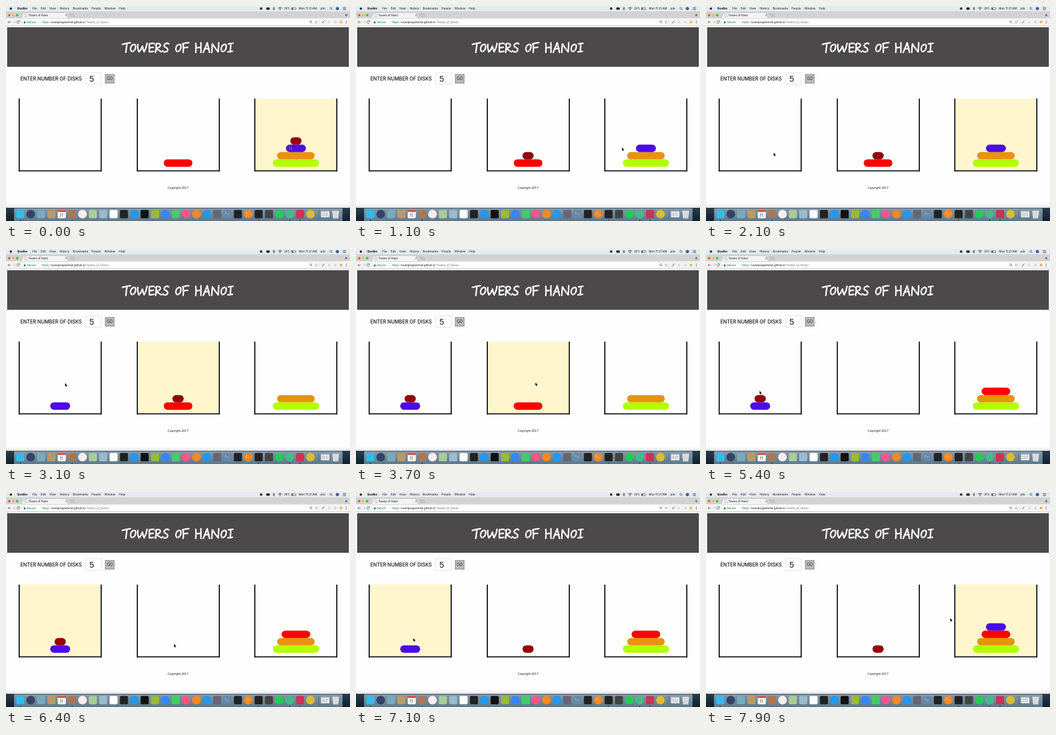
An HTML page with a canvas for the animation above (8000 ms loop, 600 by 375 pixels).

```html
<!DOCTYPE html>
<html lang="en">
<head>
<meta charset="utf-8">
<title>Towers of Hanoi</title>
<style>
html, body { margin: 0; width: 100%; height: 100%; overflow: hidden; background: #fff; }
canvas { display: block; width: 600px; height: 375px; }
</style>
</head>
<body>
<canvas id="stage" role="img" aria-label="Towers of Hanoi"></canvas>
<script>
const LOOP = 8000, STEP = 100;
const canvas = document.getElementById('stage');
const ctx = canvas.getContext('2d');
const dpr = window.devicePixelRatio || 1;
canvas.width = 600 * dpr;
canvas.height = 375 * dpr;

const UI = 'Inter, sans-serif', WEB = 'Lato, sans-serif', TAB = 'Roboto, sans-serif';

// Disks are numbered from small to large; pegs from left to right
const COLORS = ['#94000d', '#4c0be8', '#fe0000', '#e8930c', '#b3ff00'];
const START = [[], [2], [4, 3, 1, 0]];
const START_PICK = 2;
const pegX = i => 94.5 + 205.6 * i;
const diskWidth = n => 19.5 + 15.3 * n;

// Pointer stops: arrive, leave, x, y. Leaving a stop over a peg clicks it.
const STOPS = [
  [400, 600, 318, 250], [1300, 1600, 500, 246], [2100, 2200, 118, 256],
  [2400, 2700, 305, 250], [3100, 3200, 103, 234], [3500, 3700, 313, 233],
  [4000, 4100, 500, 240], [4150, 4200, 498, 240], [4600, 4900, 181, 235],
  [5200, 5300, 95, 246], [5500, 5700, 92, 249], [6400, 6700, 293, 265],
  [6900, 7100, 100, 255], [7500, 7800, 532, 232], [7820, 7840, 530, 231],
  [7900, LOOP, 426, 220]
];
const POINTER_START = [0, 0, 495, 244];

// Handwritten capitals: advance and pen strokes
const GLYPHS = {
  T: [14, 'M1 5Q7 3 15 2M9 3Q8 11 7 19'],
  O: [12, 'M7 5C2 6 0 12 2 16C4 20 10 15 10 10C11 5 8 4 5 6'],
  W: [20, 'M2 5Q1 13 4 18Q8 14 10 8Q11 14 13 18Q17 11 18 3'],
  E: [11, 'M10 3Q5 3 2 4Q2 12 2 18Q6 18 10 17M2 11L9 10'],
  R: [13, 'M3 4Q3 12 2 19M1 5C7 1 13 5 9 9Q7 11 3 12Q7 15 12 18'],
  S: [13, 'M12 4C8 1 3 5 4 8C5 11 11 10 10 15C9 19 3 19 1 16'],
  F: [12, 'M2 4Q3 12 2 19M1 4Q7 2 12 2M2 11L10 10'],
  H: [14, 'M2 3Q3 11 2 19M11 2Q11 10 11 19M2 11L11 10'],
  A: [14, 'M1 19Q5 10 8 2Q10 11 12 19M3 13L11 12'],
  N: [17, 'M2 19Q2 11 3 4Q8 12 13 18Q14 10 14 2'],
  I: [9, 'M2 4L10 3M6 4Q6 11 5 18M1 18L9 17'],
  ' ': [10, '']
};

function rect(x, y, w, h, fill) {
  ctx.fillStyle = fill;
  ctx.fillRect(x, y, w, h);
}

function round(x, y, w, h, r, fill) {
  ctx.fillStyle = fill;
  ctx.beginPath();
  ctx.roundRect(x, y, w, h, r);
  ctx.fill();
}

function dot(x, y, r, fill) {
  ctx.fillStyle = fill;
  ctx.beginPath();
  ctx.arc(x, y, r, 0, Math.PI * 2);
  ctx.fill();
}

function stroke(d, color, width = 0.8) {
  ctx.strokeStyle = color;
  ctx.lineWidth = width;
  ctx.stroke(new Path2D(d));
}

function shape(d, fill, line, width = 0.5) {
  ctx.fillStyle = fill;
  ctx.fill(new Path2D(d));
  stroke(d, line, width);
}

function fade(y0, y1, from, to) {
  const g = ctx.createLinearGradient(0, y0, 0, y1);
  g.addColorStop(0, from);
  g.addColorStop(1, to);
  return g;
}

// Draws text and returns its right edge
function text(str, x, y, size, family, fill, weight = 400) {
  ctx.font = `${weight} ${size}px ${family}`;
  ctx.fillStyle = fill;
  ctx.fillText(str, x, y);
  return x + ctx.measureText(str).width;
}

function magnifier(x, y) {
  stroke(`M${x + 1.7} ${y}a1.7 1.7 0 1 0 -3.4 0a1.7 1.7 0 1 0 3.4 0M${x + 1.2} ${y + 1.2}l1.6 1.6`, '#444', 0.7);
}

function menuBar() {
  rect(0, 0, 600, 9.5, '#e3ebef');
  dot(8.5, 4.4, 2, '#222');
  text('Quelbo', 19.5, 6.2, 5.1, UI, '#111', 700);
  let x = 46;
  for (const name of 'File Edit View History Bookmarks People Window Help'.split(' ')) {
    x = text(name, x, 6.2, 5, UI, '#151515') + 6.2;
  }

  dot(445, 4.4, 2.2, '#333');
  round(454, 2.5, 6, 4, 1, '#222');
  stroke('M467 1.8V7.2L469 5.6L465.2 3.2M465.2 5.8L469 3.4L467 1.8', '#333', 0.6);
  stroke('M474.5 3.6Q478 0.8 481.5 3.6M476 5Q478 3.4 480 5', '#222');
  dot(478, 6.5, 0.7, '#222');
  text('28%', 485, 6.2, 4.7, UI, '#222');
  stroke('M498 2.8H505V6.4H498ZM506 4V5.2', '#444', 0.6);
  rect(498.5, 3.2, 2, 2.8, '#333');
  text('Mon 11:21 AM', 511, 6.2, 4.9, UI, '#151515');
  text('pilo', 548.5, 6.2, 4.9, UI, '#151515');
  magnifier(566.5, 4);
  dot(578, 4.5, 2.8, '#3c5a9c');
  for (let i = 0; i < 3; i++) rect(587.5, 2.2 + i * 1.9, 5.5, 0.7, '#333');
}

function browser() {
  rect(0, 9.5, 600, 12, '#d2d2d2');
  ['#fc5b57', '#fdbd3e', '#34c84a'].forEach((c, i) => dot(5.5 + i * 7, 16, 2.2, c));
  shape('M25 21.5Q27.5 21 29 16L30 13Q30.5 11.7 32 11.7H103Q104.5 11.7 105 13L107 19Q108 21.5 110 21.5Z', '#f3f3f3', '#b0b0b0');
  stroke('M33 13.5H35.5L36.8 15V18.8H33Z', '#888', 0.5);
  text('Towers of Hanoi', 39, 18, 4.7, TAB, '#222');
  stroke('M103 14.8L106 17.8M106 14.8L103 17.8', '#666', 0.6);
  shape('M110.5 13.5H118L120.5 18.5H113Z', '#c6c6c6', '#b0b0b0');
  dot(593.5, 16, 2, '#777');

  rect(0, 21.5, 600, 13, '#f3f3f3');
  rect(0, 34.2, 600, 0.6, '#c4c4c4');
  stroke('M8.5 28H3.5M5.7 25.8L3.5 28L5.7 30.2', '#555');
  stroke('M11.5 28H16.5M14.3 25.8L16.5 28L14.3 30.2', '#bbb');
  stroke('M23.2 26.6A2.3 2.3 0 1 0 23.4 28.8M23.6 25.2V27.2H21.5', '#555');
  round(27.7, 22.7, 517.6, 10.6, 1.7, '#cfcfcf');
  round(28, 23, 517, 10, 1.5, '#fff');
  rect(31, 27.5, 3.2, 2.7, '#0b8043');
  stroke('M31.7 27.5V26.4Q32.6 25 33.5 26.4V27.5', '#0b8043', 0.5);
  text('Secure', 36.5, 30, 5, TAB, '#0b8043');
  rect(59.5, 25, 0.4, 6, '#ccc');
  let x = text('https', 63, 30, 4.9, TAB, '#0b8043');
  x = text('://', x, 30, 4.9, TAB, '#888');
  x = text('ruvenprogrammer.github.io', x, 30, 4.9, TAB, '#222');
  text('/Towers_of_Hanoi/', x, 30, 4.9, TAB, '#777');

  magnifier(531.5, 27.4);
  stroke('M541 25.4L541.8 27.2L543.6 27.3L542.2 28.5L542.7 30.4L541 29.3L539.3 30.4L539.8 28.5L538.4 27.3L540.2 27.2Z', '#777', 0.5);
  stroke('M551.2 30.2L555.2 25.8', '#444', 1);
  dot(563.5, 28, 2, '#d8d8d8');
  dot(574.5, 28, 2, '#d2d2d2');
  round(582.3, 26, 4, 4, 0.5, '#eeb04e');
  for (let i = 0; i < 3; i++) dot(593.5, 26 + i * 2, 0.65, '#555');
}

function title(str, x, y) {
  ctx.lineCap = ctx.lineJoin = 'round';
  for (const ch of str) {
    const [advance, path] = GLYPHS[ch];
    ctx.save();
    ctx.translate(x, y);
    stroke(path, '#fff', 2.5);
    ctx.restore();
    x += advance;
  }
  ctx.lineCap = 'butt';
  ctx.lineJoin = 'miter';
}

function page() {
  rect(0, 34.8, 600, 317, '#fefefe');
  rect(2, 37, 596, 69, '#4b494a');
  title('TOWERS OF HANOI', 202, 62);
  text('ENTER NUMBER OF DISKS', 25, 130.3, 8.45, UI, '#111', 500);
  rect(138.5, 115.8, 28, 21.4, '#d9d9d9');
  rect(139.3, 116.6, 26.4, 19.8, '#fff');
  text('5', 145.6, 132, 14.4, '"Liberation Sans", sans-serif', '#111');
  rect(172.7, 118.9, 16.4, 16.2, '#777');
  rect(173.5, 119.7, 14.8, 14.6, '#bababa');
  text('GO', 176, 129.4, 6.6, WEB, '#222');
  text('Copyright 2017', 282, 319.3, 5.25, WEB, '#222');
}

// s: square, c: circle
const ICONS = ('s3be c346 s7ab sb96 sfff sa75 cfee sac9 s9bc sfff s222 c29e s111 s9b3 ' +
  'c38f s4c6 cf58 cf82 c29e s667 s68a s222 cf82 s222 s444 c2c5 c4b8 sc35 cdb3 c357').split(' ');

function dock() {
  rect(0, 351.5, 600, 24, fade(352, 375, '#2a3c4c', '#0f1f2e'));
  round(0, 344, 600, 8, [0, 0, 3, 3], fade(344, 352, '#fefefe', '#e6e7e9'));
  round(14, 352.8, 573, 24, [2, 2, 0, 0], fade(353, 375, '#8399a9', '#5c788c'));

  // The last square leaves room for the divider
  const pitch = 18.07, at = i => 25 + i * pitch;
  ICONS.slice(0, 29).forEach((icon, i) => {
    const fill = '#' + icon.slice(1);
    if (icon[0] === 'c') dot(at(i), 363, 7.6, fill);
    else round(at(i) - 7, 355.8, 14, 14.4, 2, fill);
  });

  rect(at(4) - 7, 355.8, 14, 3.5, '#e5483c');
  text('11', at(4) - 3.7, 367.6, 7, UI, '#333');
  for (const x of [at(20), at(22)]) {
    stroke(`M${x - 4.5} 359l2 2l-2 2M${x - 1.5} 363h3.5`, '#ddd', 0.7);
  }

  rect(545, 355, 0.6, 17, '#465d6e');
  rect(549.5, 357, 14.5, 11.5, '#eee');
  rect(549.5, 357, 14.5, 2, '#b5b7bb');
  for (let y = 361; y < 367; y += 2) rect(551, y, 11, 0.7, '#aaa');
  shape('M569 357H581L579.5 370.5H570.5Z', '#e3e5e7', '#a5a8ac');
  stroke('M572 358L573 370M575 358V370M578 358L577 370', '#a5a8ac', 0.5);
  for (const i of [0, 5, 23, 26, 27]) dot(at(i), 373.6, 0.8, '#111');
}

// Plays every click up to t: the first picks a peg, the second drops its top disk
function gameAt(t) {
  const pegs = START.map(p => [...p]);
  let pick = START_PICK;
  for (const [, leave, x] of STOPS) {
    const peg = pegs.findIndex((_, i) => Math.abs(x - pegX(i)) < 72);
    if (leave > t || peg < 0) continue;
    if (pick < 0) { pick = peg; continue; }
    const disk = pegs[pick].at(-1), under = pegs[peg].at(-1) ?? Infinity;
    if (disk < under) pegs[peg].push(pegs[pick].pop());
    pick = -1;
  }
  return { pegs, pick };
}

function towers(t) {
  const { pegs, pick } = gameAt(t);
  pegs.forEach((stack, i) => {
    const cx = pegX(i), left = Math.round(cx - 72.5);
    if (i === pick) rect(left, 161.5, 145, 126, '#fff6ce');
    rect(left, 161.5, 2, 127, '#161a1d');
    rect(left + 143, 161.5, 2, 127, '#161a1d');
    rect(left, 286.5, 145, 2, '#161a1d');
    stack.forEach((n, row) => {
      const w = diskWidth(n);
      round(cx - w / 2, 267.5 - row * 12.85, w, 12.9, 6.4, COLORS[n]);
    });
  });
}

function pointer(t) {
  const next = STOPS.findIndex(s => s[1] > t);
  const [, from, x0, y0] = STOPS[next - 1] || POINTER_START;
  const [arrive, , x1, y1] = STOPS[next];
  const k = Math.min(1, (t - from) / (arrive - from));
  const e = k * k * (3 - 2 * k);
  ctx.save();
  ctx.translate(x0 + (x1 - x0) * e, y0 + (y1 - y0) * e);
  const arrow = 'M0 0V5.4L1.2 4.4L2 6.3L3 5.9L2.2 4.1H3.8Z';
  stroke(arrow, '#fff', 0.9);
  shape(arrow, '#111', '#111', 0.1);
  ctx.restore();
}

function draw(t) {
  ctx.setTransform(dpr, 0, 0, dpr, 0, 0);
  page();
  menuBar();
  browser();
  dock();
  towers(t);
  pointer(t);
}

const begin = performance.now();
function frame() {
  const t = (performance.now() - begin) % LOOP;
  draw(Math.floor(t / STEP) * STEP);
  requestAnimationFrame(frame);
}
frame();
</script>
</body>
</html>
```
